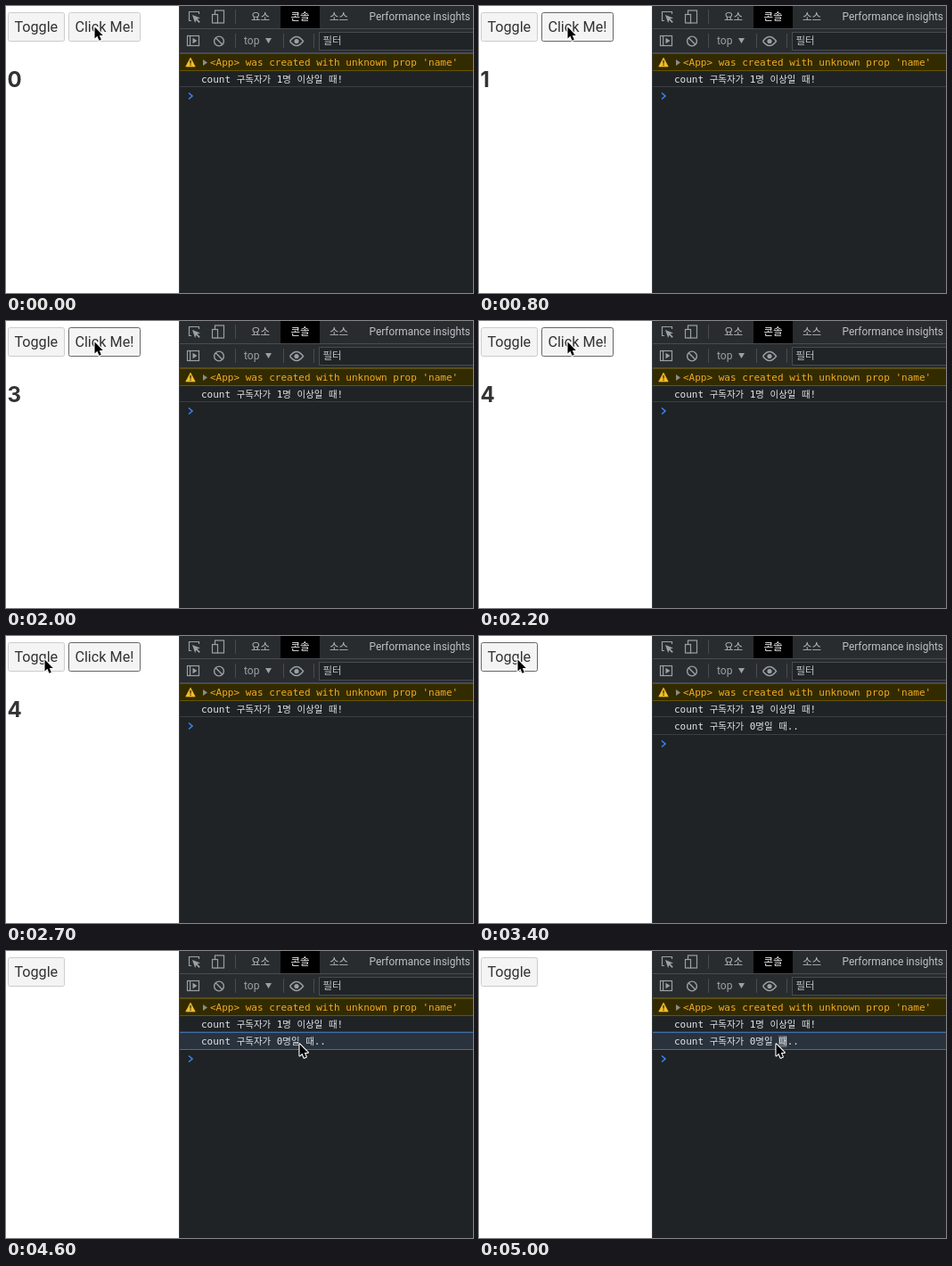
An HTML page with a canvas for the animation above (5.1 s loop, 524 px wide and 322 px high).

```html
<!DOCTYPE html>
<html lang="ko">
<head>
<meta charset="utf-8">
<title>Toggle and console</title>
<style>
  html, body { margin: 0; width: 100%; height: 100%; overflow: hidden; background: #fff; }
  canvas { display: block; width: 524px; height: 322px; }
</style>
</head>
<body>
<canvas id="stage"></canvas>
<script>
const W = 524, H = 322, LOOP = 5100, STEP = 100;
const UI = 'Roboto, "Noto Sans CJK KR", sans-serif';
const MONO = '"DejaVu Sans Mono", monospace';
const HANGUL = '"Noto Sans CJK KR", "Noto Sans CJK", sans-serif';
const ICON = '#9aa0a6', LINE = '#494c50', PANEL = '#1f2325', BAR = '#292c2e';

const canvas = document.getElementById('stage');
const ctx = canvas.getContext('2d');
const dpr = window.devicePixelRatio || 1;
canvas.width = W * dpr;
canvas.height = H * dpr;
ctx.scale(dpr, dpr);

// Pointer path: time, x, y
const path = [
  [0, 99, 23], [2400, 99, 23], [2500, 82, 22], [2600, 52, 25], [2700, 43, 26],
  [3700, 43, 26], [3800, 75, 31], [3900, 190, 53], [4000, 285, 73],
  [4100, 308, 91], [4200, 317, 99], [4300, 320, 102], [4400, 323, 103],
  [4600, 329, 104], [4900, 333, 104], [LOOP, 333, 104]
];
const presses = [300, 900, 1400, 2100];
const TOGGLE_DOWN = 3300, TOGGLE_UP = 3400, ROW_CLICK = 4400, SELECT = 5000;

function pointerAt(t) {
  const i = path.findIndex(p => p[0] > t);
  const [t0, x0, y0] = path[i - 1], [t1, x1, y1] = path[i];
  const k = (t - t0) / (t1 - t0);
  return [x0 + (x1 - x0) * k, y0 + (y1 - y0) * k];
}

function rect(x, y, w, h, color) {
  ctx.fillStyle = color;
  ctx.fillRect(x, y, w, h);
}

function text(str, x, y, font, color) {
  ctx.font = font;
  ctx.fillStyle = color;
  ctx.fillText(str, x, y);
}

function poly(points, fill, stroke, width = 1, closed = true) {
  ctx.beginPath();
  points.forEach(([x, y]) => ctx.lineTo(x, y));
  if (closed) ctx.closePath();
  if (stroke) {
    ctx.strokeStyle = stroke;
    ctx.lineWidth = width;
    ctx.stroke();
  }
  if (fill) {
    ctx.fillStyle = fill;
    ctx.fill();
  }
}

function circle(x, y, r, fill, stroke, width = 1.4) {
  ctx.beginPath();
  ctx.arc(x, y, r, 0, Math.PI * 2);
  if (fill) {
    ctx.fillStyle = fill;
    ctx.fill();
  } else {
    ctx.strokeStyle = stroke;
    ctx.lineWidth = width;
    ctx.stroke();
  }
}

function frame(x, y, w, h, color, width = 1) {
  ctx.strokeStyle = color;
  ctx.lineWidth = width;
  ctx.strokeRect(x, y, w, h);
}

function button(label, x, w, focused, pressed) {
  ctx.beginPath();
  ctx.roundRect(x + 0.5, 7.5, w - 1, 32, 2);
  ctx.fillStyle = pressed ? '#ddd' : '#f4f4f4';
  ctx.fill();
  ctx.strokeStyle = focused ? '#666' : '#ccc';
  ctx.lineWidth = 1;
  ctx.stroke();
  text(label, x + 7.4, 29, '16.2px ' + UI, '#333');
}

function page(t) {
  rect(0, 0, 194, H, '#fff');
  const shown = t < TOGGLE_UP;
  const toggleFocus = t >= TOGGLE_DOWN && t < ROW_CLICK;
  button('Toggle', 2, 64, toggleFocus, t >= TOGGLE_DOWN && t < TOGGLE_UP);
  if (!shown) return;
  const down = presses.some(p => t >= p && t < p + STEP);
  const count = presses.filter(p => t >= p + STEP).length;
  button('Click Me!', 70, 81, t >= presses[0] && !toggleFocus, down);
  text(count, 1.5, 91, 'bold 24px Inter, sans-serif', '#333');
}

function tabs() {
  rect(194, 0, 330, 52, BAR);
  rect(194, 25, 330, 1, LINE);
  rect(308, 0, 44, 25, '#000');
  // Inspect
  poly([[208, 16.5], [205.5, 16.5], [205.5, 6.5], [216.5, 6.5], [216.5, 9]], null, ICON, 1.2, false);
  poly([[209, 10], [218, 13.4], [214.6, 14.6], [217.8, 17.8], [216.6, 19], [213.4, 15.8], [212.2, 19]], ICON);
  // Device
  frame(234.5, 5, 10, 14, ICON, 1.2);
  rect(230.5, 9, 7, 10.5, BAR);
  frame(231.5, 9.5, 6, 9.5, ICON, 1.2);
  rect(257, 4, 1, 16, LINE);
  text('요소', 275, 16, '11.5px ' + UI, '#bdc1c6');
  text('콘솔', 319.5, 16, '11.5px ' + UI, '#fff');
  text('소스', 363, 16, '11.5px ' + UI, '#bdc1c6');
  text('Performance insights', 407.5, 16, '11.9px ' + UI, '#bdc1c6');
}

function toolbar() {
  rect(194, 52, 330, 1, LINE);
  // Sidebar
  frame(203.5, 33.5, 13, 11, ICON, 1.2);
  rect(206, 33, 1.2, 12, ICON);
  poly([[209.5, 35.8], [214.5, 39], [209.5, 42.2]], ICON);
  // Clear
  circle(239, 39.5, 5.4, null, ICON);
  poly([[235.2, 35.7], [242.8, 43.3]], null, ICON, 1.4, false);
  for (const x of [257, 311, 345]) rect(x, 31, 1, 16, LINE);
  text('top', 267, 43, '12px ' + UI, ICON);
  poly([[291, 36], [298, 36], [294.5, 42]], ICON);
  // Eye
  ctx.beginPath();
  ctx.moveTo(318.5, 39.5);
  ctx.quadraticCurveTo(326, 29.5, 333.5, 39.5);
  ctx.quadraticCurveTo(326, 49.5, 318.5, 39.5);
  ctx.strokeStyle = ICON;
  ctx.lineWidth = 1.4;
  ctx.stroke();
  circle(326, 39.5, 2.6, ICON);
  rect(351, 29, 173, 21, '#202426');
  frame(351.5, 29.5, 180, 20, LINE);
  text('필터', 355.5, 43, '11.5px ' + UI, '#bdc1c6');
}

// Latin and Hangul runs use their own font sizes
function logLine(str, y) {
  let x = 219;
  for (const run of str.match(/[가-힣]+|[^가-힣]+/g)) {
    const font = /[가-힣]/.test(run) ? '10.43px ' + HANGUL : '11px ' + MONO;
    text(run, x, y, font, '#e4e6e8');
    x += ctx.measureText(run).width;
  }
}

function consoleRows(t) {
  rect(194, 53, 330, H - 53, PANEL);
  rect(194, 53, 330, 20, '#332b00');
  rect(194, 53, 330, 1, '#5c4d00');
  rect(194, 72, 330, 1, '#665500');
  poly([[207, 58], [212.3, 68], [201.7, 68]], '#f5bd2c', '#f5bd2c', 0.6);
  rect(206.4, 61, 1.3, 3.7, '#332b00');
  rect(206.4, 65.6, 1.3, 1.3, '#332b00');
  poly([[221, 60], [226, 63.5], [221, 67]], '#8b8d88');
  text("<App> was created with unknown prop 'name'", 229, 67, '11px ' + MONO, '#f2ab26');

  logLine('count 구독자가 1명 이상일 때!', 86);
  rect(194, 90, 330, 1, '#3a3e41');

  const added = t >= TOGGLE_UP;
  if (added) {
    const active = t >= ROW_CLICK;
    if (active) {
      rect(194, 91, 330, 20, '#29323d');
      rect(194, 91, 330, 1, '#3f6ea8');
    }
    rect(194, 110, 330, 1, active ? '#3f6ea8' : '#3a3e41');
    if (t >= SELECT) rect(336, 95, 9.5, 13, '#5f666e');
    logLine('count 구독자가 0명일 때..', 105);
  }
  const y = added ? 121 : 101;
  poly([[205, y - 3.5], [209, y], [205, y + 3.5]], null, '#3b82f0', 1.6, false);
}

function pointer(t) {
  const [x, y] = pointerAt(t);
  ctx.save();
  ctx.translate(x, y);
  ctx.lineJoin = 'round';
  poly([[0.5, 0.5], [0.5, 13.5], [3.4, 10.8], [5.5, 15.8], [7.8, 14.8], [5.8, 10], [9.8, 10]],
    '#000', '#fff', 2.2);
  ctx.restore();
}

function draw(now) {
  const t = Math.floor((now % LOOP) / STEP) * STEP;
  page(t);
  tabs();
  toolbar();
  consoleRows(t);
  rect(194, 0, 1, H, '#3c4043');
  pointer(t);
}

const start = performance.now();
function tick() {
  draw(performance.now() - start);
  requestAnimationFrame(tick);
}
tick();
</script>
</body>
</html>
```
